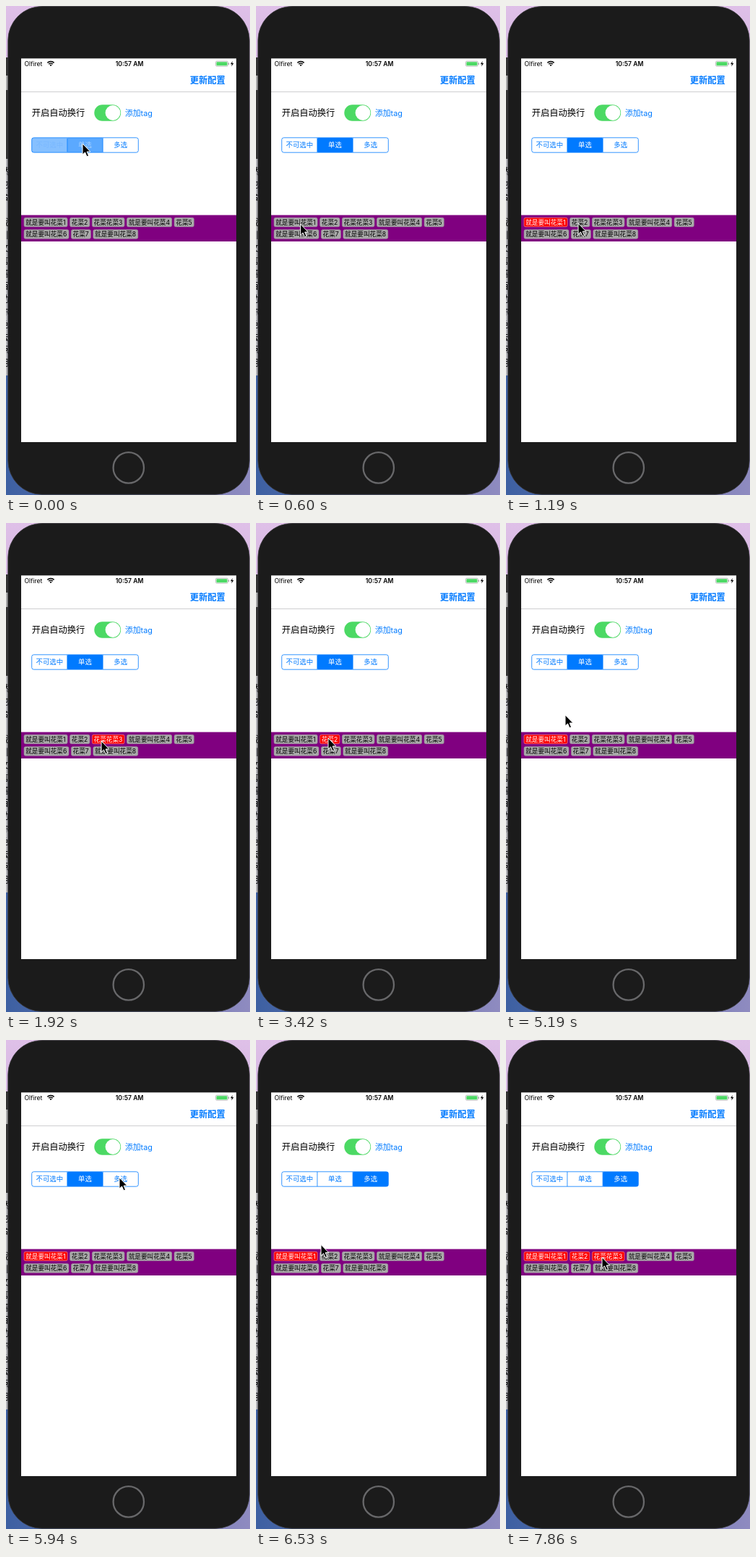
Write an HTML page that moves like this. It is 338x675 px and loops after 8 s.

```html
<!DOCTYPE html>
<html lang="zh">
<head>
<meta charset="utf-8">
<style>
html, body { margin: 0; width: 100%; height: 100%; overflow: hidden; background: #1b1b1b; }
svg { display: block; width: 100%; height: 100%; }
text { font-family: Inter, "Noto Sans CJK SC", "Noto Sans CJK", sans-serif; font-size: 8.64px; }
.blue { fill: #007aff; }
.seg { text-anchor: middle; font-size: 9.4px; }
.big { font-size: 12.24px; }
</style>
</head>
<body>
<svg viewBox="0 0 338 675">
  <defs>
    <linearGradient id="sky" x2="0" y2="1">
      <stop offset="0" stop-color="#dfc0e8"/>
      <stop offset=".3" stop-color="#c3a8d4"/>
      <stop offset="1" stop-color="#77749f"/>
    </linearGradient>
    <linearGradient id="sea">
      <stop offset="0" stop-color="#3d60a2"/>
      <stop offset="1" stop-color="#8f8bc0"/>
    </linearGradient>
  </defs>
  <rect width="338" height="675" fill="url(#sky)"/>
  <rect y="510" width="338" height="165" fill="url(#sea)"/>
  <rect y="71" width="6" height="140" fill="#333"/>
  <rect y="96" width="6" height="20" fill="#aaa"/>
  <rect y="211" width="6" height="299" fill="#b4b4b8"/>
  <g id="edge"></g>
  <rect x="2.8" y=".5" width="334.4" height="673.8" rx="47" fill="#1b1b1b" stroke="#3c3c3e" stroke-width=".8"/>
  <circle cx="169.8" cy="637.4" r="21.2" fill="none" stroke="#68686a" stroke-width="2.3"/>
  <rect x="21" y="72.4" width="298" height="529.6" fill="#fff"/>
  <rect x="21" y="118" width="298" height=".8" fill="#c4c4c6"/>

  <text x="25.5" y="83">Olfiret</text>
  <path d="M57.4 78.4A6.5 6.5 0 0 1 66.6 78.4M59.2 80.3A4 4 0 0 1 64.8 80.3" fill="none" stroke="#000" stroke-width="1.5"/>
  <path d="M60.5 81.6A2.1 2.1 0 0 1 63.5 81.6L62 83.2Z"/>
  <text x="171" y="83" font-weight="600" text-anchor="middle">10:57 AM</text>
  <rect x="290.5" y="76.2" width="17" height="7" rx="1.6" fill="none" stroke="#999" stroke-width=".6"/>
  <rect x="291.5" y="77.2" width="15" height="5" rx=".8" fill="#4cd964"/>
  <rect x="308.2" y="78.5" width="1" height="2.4" rx=".5" fill="#999"/>
  <path d="M313.8 76L311 80.3H313L312.2 83.5L315.4 79H313.3Z"/>

  <text class="blue big" x="254.8" y="107.3" font-weight="600">更新配置</text>
  <text class="big" x="35.8" y="152.2">开启自动换行</text>
  <rect x="122.3" y="136.3" width="36.8" height="22.4" rx="11.2" fill="#4cd964"/>
  <circle cx="148" cy="147.5" r="10.4" fill="#fff"/>
  <text class="blue" x="165" y="151.6" style="font-size:10.8px">添加tag</text>

  <g id="segs"></g>
  <rect x="35.7" y="181.8" width="147.6" height="20.4" rx="2.8" fill="none" stroke="#007aff" stroke-width=".8"/>
  <path d="M84.9 182V202M134.1 182V202" stroke="#007aff" stroke-width=".8"/>

  <rect x="21" y="288.6" width="298" height="36.4" fill="#800080"/>
  <g id="tags"></g>
  <path id="cursor" d="M0 0V15.2L3.5 12L6 17.8L8.5 16.7L6.1 11.1H10.8Z" stroke="#fff"/>
</svg>
<script>
// All times below are in steps; the picture holds during a step
const STEPS = 54, STEP = 8000 / STEPS;
const MULTI = 42; // step of the switch to multiple choice

// Pointer moves: from step, to step, x, y
const moves = [[0, 0, 106, 190], [0, 4, 61.5, 301], [6, 8, 100, 300], [9, 11, 132, 301],
  [20, 22, 100, 297], [23, 26, 66, 297], [34, 35, 82, 265], [35, 39, 157, 190],
  [42, 44, 90, 282.5], [44, 45, 73, 300], [46, 48, 98, 300], [50, 52, 133, 300]];

// Clicks on tags: step, tag number
const clicks = [[6, 1], [9, 2], [13, 3], [23, 2], [27, 1], [49, 2], [53, 3]];

const $ = id => document.getElementById(id);

$("edge").innerHTML = [..."然也合、我引文言情百动你色去点用"].map((ch, i) =>
  `<text x="-8" y="${233 + i * 17.6}" style="font-size:12px">${ch}</text>`).join("");

const SEG_W = 49.2;
$("segs").innerHTML = ["不可选中", "单选", "多选"].map((name, i) => {
  const x = 35.7 + i * SEG_W;
  const label = color => `<text class="seg" x="${x + SEG_W / 2}" y="195.4" fill="${color}">${name}</text>`;
  return label("#007aff") +
    `<g class="on"><rect x="${x}" y="182" width="${SEG_W}" height="20" rx="1.5" fill="#007aff"/>${label("#fff")}</g>`;
}).join("");

// Tags flow from left to right and wrap at the screen edge
$("tags").innerHTML = ["就是要叫花菜", "花菜", "花菜花菜", "就是要叫花菜", "花菜", "就是要叫花菜", "花菜", "就是要叫花菜"]
  .map((name, i) => `<g><rect height="12.4" rx="2" stroke-width=".6"/><text x="2.2" y="9.3">${name}${i + 1}</text></g>`).join("");
const tags = [...$("tags").children];
let x = 25, y = 292.3;
for (const tag of tags) {
  const [box, label] = tag.children, w = label.getComputedTextLength() + 4.8;
  if (x + w > 319) { x = 25; y += 16.5; }
  box.setAttribute("width", w);
  tag.setAttribute("transform", `translate(${x} ${y})`);
  x += w + 3.5;
}

function pointer(k) {
  let px = 0, py = 0;
  for (const [from, to, x, y] of moves) {
    if (k < from) break;
    const u = Math.min(1, (k - from) / (to - from || 1)), e = to > from ? u * u * (3 - 2 * u) : 1;
    px += (x - px) * e;
    py += (y - py) * e;
  }
  return [px, py];
}

// One step of cross-fade after a switch between segments
function segFill(i, k) {
  const on = k < MULTI ? 1 : 2, fading = k === 0 || k === MULTI;
  if (i === on) return fading ? .64 : 1;
  return fading && i === on - 1 ? .47 : 0;
}

function picked(k) {
  let set = [];
  for (const [step, tag] of clicks)
    if (step <= k) set = step > MULTI ? [...set, tag] : [tag];
  return set;
}

const segOn = document.querySelectorAll(".on");

function draw(ms) {
  const k = Math.floor((ms + 8) / STEP) % STEPS, set = picked(k);
  segOn.forEach((g, i) => g.setAttribute("opacity", segFill(i, k)));
  tags.forEach((tag, i) => {
    const on = set.includes(i + 1), [box, label] = tag.children;
    box.setAttribute("fill", on ? "#f00" : "#aaa");
    box.setAttribute("stroke", on ? "#ff9a90" : "#999");
    label.setAttribute("fill", on ? "#fff" : "#000");
  });
  $("cursor").setAttribute("transform", `translate(${pointer(k)})`);
}

let start;
function loop(now) {
  start ??= now;
  draw(now - start);
  requestAnimationFrame(loop);
}
draw(0);
requestAnimationFrame(loop);
</script>
</body>
</html>
```
